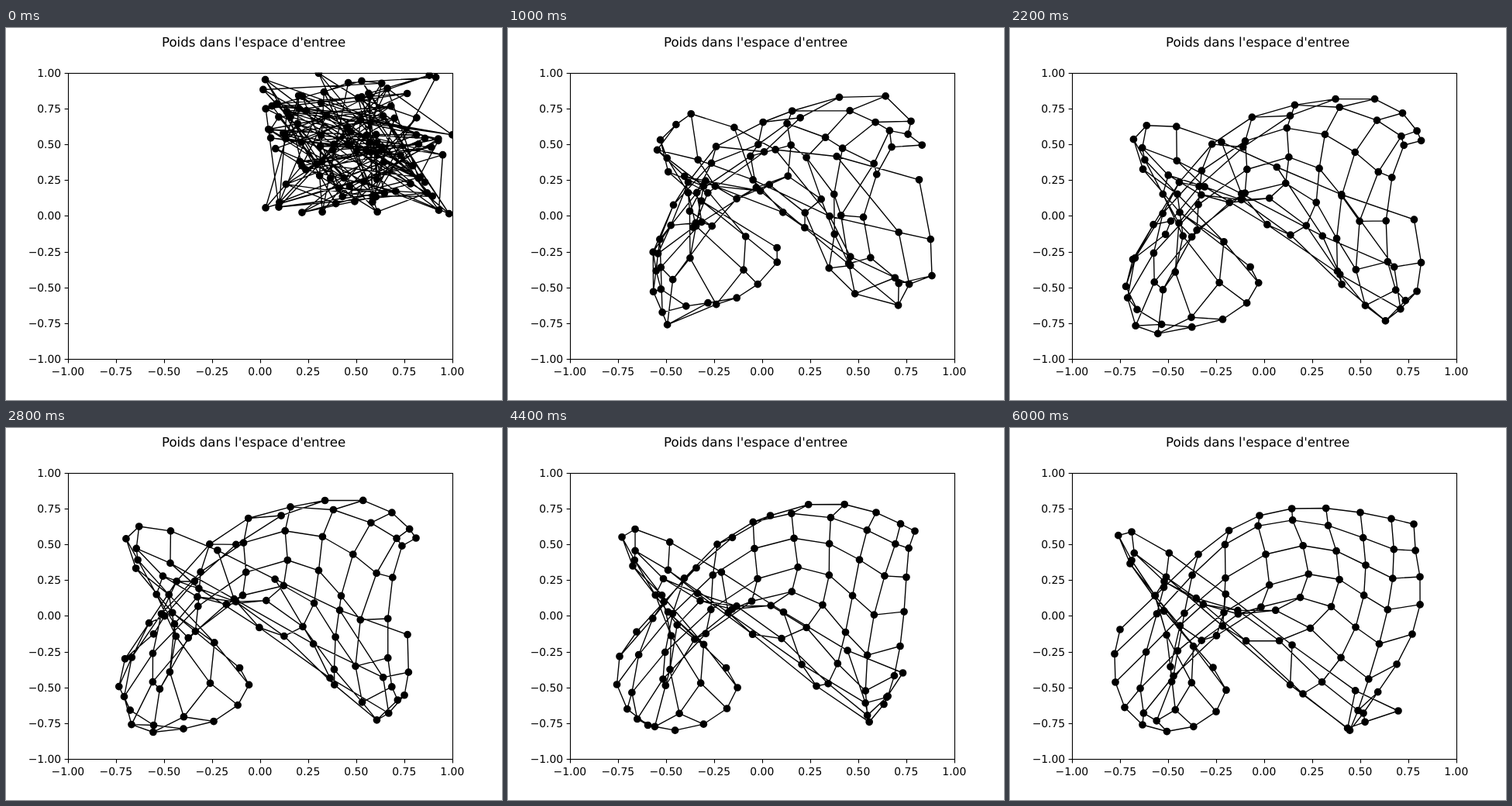
An HTML page that plays this animation: 640x480 px, repeating every 6200 ms.

```html
<!DOCTYPE html>
<html lang="fr">
<head>
<meta charset="utf-8">
<title>Poids dans l'espace d'entree</title>
<style>
  html, body { margin: 0; width: 100%; height: 100%; overflow: hidden; background: #fff; }
  svg { display: block; width: 640px; height: 480px; font-family: "DejaVu Sans", sans-serif; }
  text { text-rendering: geometricPrecision; }
  #ticks text { font-size: 13.89px; }
  #frame, #ticks line { fill: none; stroke: #000; stroke-width: 1.11; }
  #edges { fill: none; stroke: #000; stroke-width: 1.39; stroke-linejoin: round; }
  #dots { fill: none; stroke: #000; stroke-width: 9.72; stroke-linecap: round; }
</style>
</head>
<body>
<svg viewBox="0 0 640 480">
  <clipPath id="area"><rect x="80" y="57.6" width="496" height="369.6"/></clipPath>
  <text x="319.6" y="23.5" font-size="16.67" text-anchor="middle">Poids dans l'espace d'entree</text>
  <g clip-path="url(#area)"><path id="edges"/><path id="dots"/></g>
  <g id="ticks"></g>
  <rect id="frame" x="80.5" y="58.5" width="496" height="369"/>
</svg>
<script>
const SIZE = 10, STEP = 200, LOOP = 6200;
const EARLY = 2800, LATE = 6000;    // times of the two key shapes
const SETTLE = 450;                 // how fast the random start fades
const KNOTS = [0, 2, 4, 7, 9];      // rows and columns that carry key points
const $ = id => document.getElementById(id);
const mix = (a, b, k) => a + (b - a) * k;

function drawTicks() {
  let out = '';
  for (let i = 0; i <= 8; i++) {
    const v = i / 4 - 1;
    const label = (v < 0 ? '\u2212' : '') + Math.abs(v).toFixed(2);
    const x = 80 + 62 * i, y = 427.2 - 46.2 * i;
    const px = x + 0.5, py = Math.round(y) + 0.5;
    out += `<line x1="${px}" y1="427.5" x2="${px}" y2="432.4"/>
      <line x1="75.6" y1="${py}" x2="80.5" y2="${py}"/>
      <text x="${x - 0.2}" y="448" text-anchor="middle">${label}</text>
      <text x="71.2" y="${Math.round(y + 5)}" text-anchor="end">${label}</text>`;
  }
  $('ticks').innerHTML = out;
}

// Polynomial through the values at KNOTS
const curve = (vals, t) => KNOTS.reduce((sum, k, j) =>
  sum + KNOTS.reduce((w, m) => m === k ? w : w * (t - m) / (k - m), vals[j]), 0);

// Key rows of x, y pairs become the full mesh
function surface(rows) {
  const axis = odd => {
    const lines = rows.map(row => row.filter((_, i) => i % 2 === odd));
    return (r, c) => curve(lines.map(line => curve(line, c)), r);
  };
  const fx = axis(0), fy = axis(1);
  return Array.from({ length: SIZE * SIZE }, (_, n) => {
    const r = Math.floor(n / SIZE), c = n % SIZE;
    return [fx(r, c), fy(r, c)];
  });
}

// Random weights between 0 and 1, the upper right quarter of the plot
function scatter(seed) {
  const rnd = () => (seed = (seed * 16807) % 2147483647) / 2147483647;
  return Array.from({ length: SIZE * SIZE }, () => [328 + 248 * rnd(), 242.4 - 184.8 * rnd()]);
}

const start = scatter(48271);
const early = surface([
  [190, 266, 243, 198, 355, 113, 498, 109, 529, 142],
  [145, 334, 200, 240, 306, 148, 448, 163, 499, 193],
  [190, 384, 189, 328, 305, 216, 425, 270, 493, 297],
  [299, 358, 219, 269, 202, 191, 418, 323, 514, 345],
  [301, 310, 167, 181, 171, 127, 347, 195, 518, 267]
]);
const late = surface([
  [142, 260, 243, 163, 322, 113, 452, 109, 521, 124],
  [136, 328, 225, 239, 330, 163, 459, 177, 529, 192],
  [171, 383, 211, 320, 324, 231, 446, 257, 519, 266],
  [266, 366, 202, 267, 199, 198, 378, 343, 456, 368],
  [262, 309, 155, 175, 157, 134, 364, 280, 501, 365]
]);

// The mesh drifts steadily while the random start decays
function meshAt(time) {
  const drift = (time - EARLY) / (LATE - EARLY);
  const order = 1 - Math.exp(-time / SETTLE);
  return start.map((p, n) => p.map((v, a) =>
    mix(v, mix(early[n][a], late[n][a], drift), order)));
}

function draw(time) {
  const pts = meshAt(time).map(p => p.map(v => v.toFixed(2)).join(' '));
  let edges = '';
  for (let i = 0; i < SIZE; i++) {
    const row = pts.slice(i * SIZE, (i + 1) * SIZE);
    const col = pts.filter((_, n) => n % SIZE === i);
    edges += 'M' + row.join('L') + 'M' + col.join('L');
  }
  $('edges').setAttribute('d', edges);
  $('dots').setAttribute('d', pts.map(p => `M${p}h0`).join(''));
}

let shown = -1;
function tick() {
  const time = Math.floor((performance.now() % LOOP) / STEP) * STEP;
  if (time !== shown) draw(shown = time);
  requestAnimationFrame(tick);
}

drawTicks();
tick();
</script>
</body>
</html>
```
